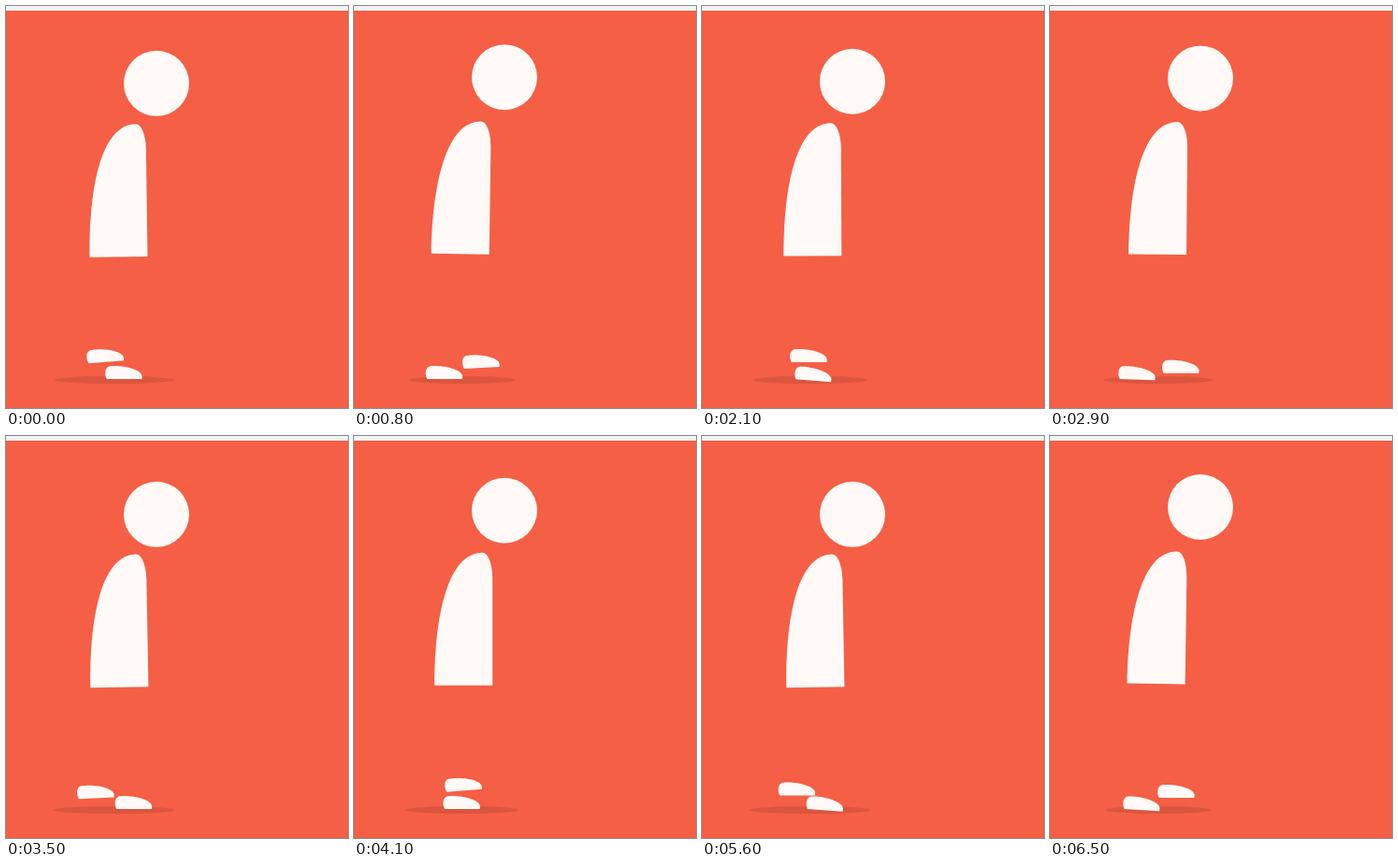
Write an HTML page that moves like this. It is 366 px wide and 430 px high and loops after 6600 ms.

```html
<!DOCTYPE html>
<html lang="en">
<head>
<meta charset="utf-8">
<title>Walk cycle</title>
<style>
  html, body { margin: 0; width: 100%; height: 100%; overflow: hidden; background: #f55f45; }
  svg { display: block; width: 366px; height: 430px; }
</style>
</head>
<body>
<svg viewBox="0 0 366 430" fill="#fffaf7">
  <rect width="366" height="430" fill="#f55f45"/>
  <rect width="366" height="5" fill="#f3f3f3"/>
  <ellipse id="shadow" cx="116" cy="400" rx="61" ry="4" fill="#db553f"/>
  <path id="farFoot" d="M1.8 0C-.8 -5 -.4 -12.8 5 -13.8C18 -15.4 40 -10.500 39.700 -2.500L39.500 0Z"/>
  <path id="nearFoot" d="M1.8 0C-.8 -5 -.4 -12.8 5 -13.8C18 -15.4 40 -10.500 39.700 -2.500L39.500 0Z"/>
  <path id="body" d="M-31 0C-31 -78 -16 -142 20 -142C26 -142 30.700 -130 30.800 -115L31 0Z"/>
  <circle id="head" cx="161" cy="80" r="35"/>
</svg>
<script>
  const LOOP = 6600, STEP = 100, STRIDE = 3830, OFFSET = 242;
  const { sin, cos, max, floor, PI } = Math;
  const part = id => document.getElementById(id);
  const shadow = part('shadow'), body = part('body'), head = part('head');
  const nearFoot = part('nearFoot'), farFoot = part('farFoot');

  const place = (el, x, y, angle = 0) =>
    el.setAttribute('transform', `translate(${x} ${y}) rotate(${angle})`);

  // The foot slides back along the ground, then swings forward in an arc.
  const placeFoot = (el, phase, angle) =>
    place(el, 96.3 - 25 * sin(phase), 399 - 18 * max(0, -cos(phase)), angle);

  function draw() {
    const t = floor(performance.now() % LOOP / STEP) * STEP;
    const phase = 2 * PI * (t - OFFSET) / STRIDE;
    const dip = -sin(2 * phase);

    placeFoot(nearFoot, phase, 0);
    placeFoot(farFoot, phase + PI, -4.8 * cos(phase));
    place(body, 117.6 + 4 * dip, 267 + 1.9 * dip, -0.95 * dip);
    head.setAttribute('cy', 80 + 4 * dip);
    shadow.setAttribute('rx', 61 + 4 * dip);
    requestAnimationFrame(draw);
  }
  draw();
</script>
</body>
</html>
```
